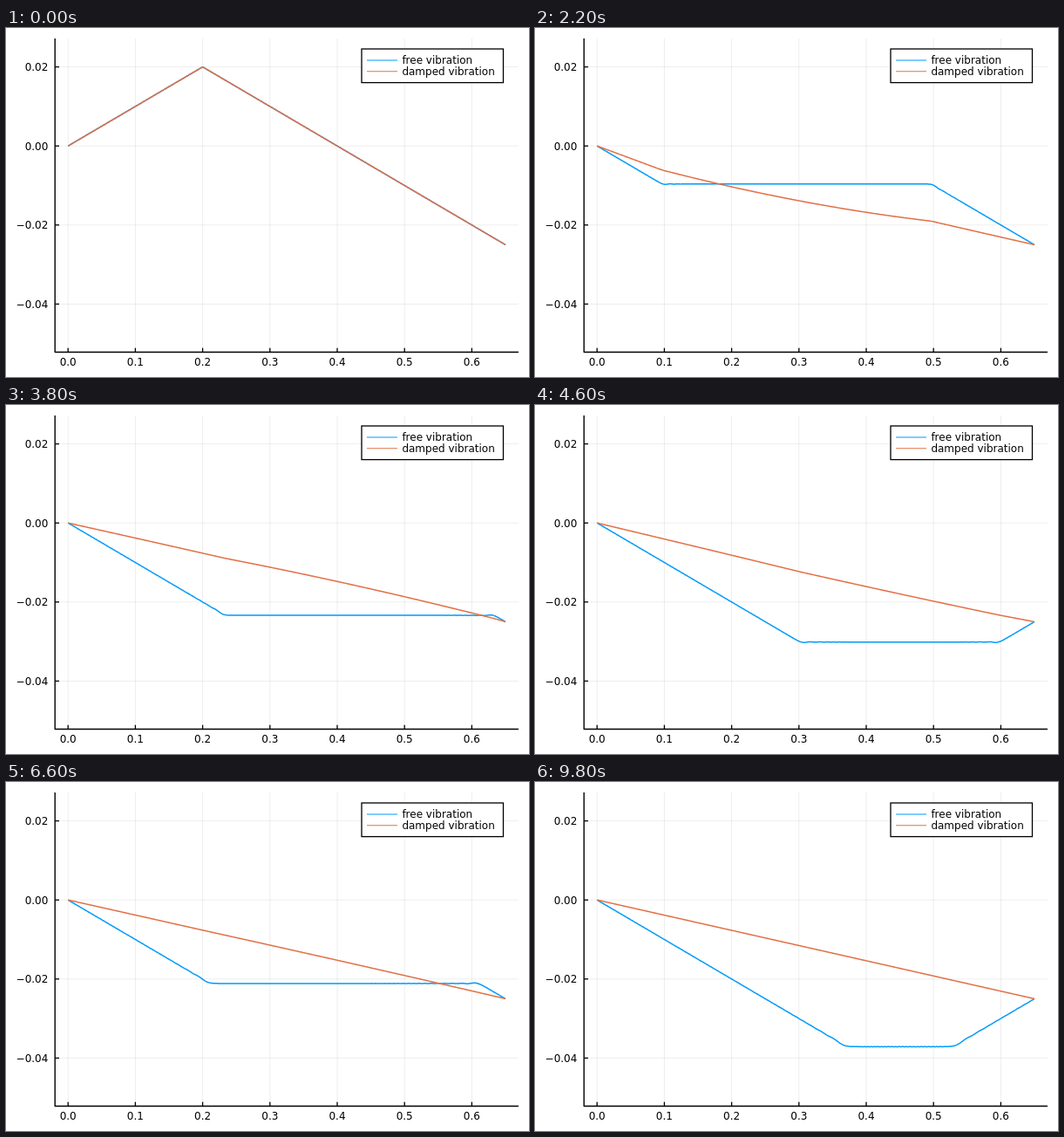
Recreate the animation shown at these times as an HTML page. Size 600 by 400 pixels, loop 10 s.

```html
<!DOCTYPE html>
<html>
<head>
<meta charset="utf-8">
<style>
  html, body { margin: 0; width: 100%; height: 100%; overflow: hidden; background: #fff; }
  svg { display: block; }
  text { font: 12px "DejaVu Sans", sans-serif; }
  path { fill: none; stroke-linejoin: round; }
</style>
</head>
<body>
<svg id="plot" width="600" height="400" viewBox="0 0 600 400"></svg>
<script>
const LENGTH = 0.65, PLUCK = 0.2, END_Y = -0.025;
const FRAMES = 50, FRAME_MS = 200;
const WAVE_STEP = 0.09125;   // distance a wave travels per frame
const DAMPING = 0.15;        // amplitude decay rate per frame
const CELLS = 1000;          // string grid, gives the slight dispersion
const SAMPLES = 650, MODES = 600;
const BLUE = '#009afa', ORANGE = '#e26f46';

const svg = document.getElementById('plot');
const px = x => 71.2 + 772 * x;
const py = y => 135.2 - 4530 * y;

function add(tag, attrs, text = '') {
  const el = document.createElementNS('http://www.w3.org/2000/svg', tag);
  for (const key in attrs) el.setAttribute(key, attrs[key]);
  el.textContent = text;
  return svg.appendChild(el);
}
const stroke = (d, color, width) => add('path', { d, stroke: color, 'stroke-width': width });
const label = (x, y, text, anchor) => add('text', { x, y, 'text-anchor': anchor }, text);

// Grid, ticks and axes
for (let i = 0; i <= 6; i++) {
  const x = px(i / 10);
  stroke(`M${x} 12V371.5`, 'rgba(0,0,0,.1)', 0.7);
  stroke(`M${x} 371.5v-4.8`, '#000', 1.3);
  label(x, 387.2, (i / 10).toFixed(1), 'middle');
}
for (let i = -2; i <= 1; i++) {
  const y = py(i * 0.02);
  stroke(`M56 ${y}H588`, 'rgba(0,0,0,.1)', 0.7);
  stroke(`M56 ${y}h5`, '#000', 1.3);
  label(48.4, y + 4.3, (i * 0.02).toFixed(2).replace('-', '\u2212'), 'end');
}
stroke('M56.2 12V371.5H588', '#000', 1.4);

const freeCurve = stroke('', BLUE, 1.5);
const dampedCurve = stroke('', ORANGE, 1.5);

// Legend
add('rect', { x: 408, y: 24, width: 162.5, height: 38.6, fill: '#fff', stroke: '#000', 'stroke-width': 1.3 });
[['free vibration', BLUE, 37], ['damped vibration', ORANGE, 49.8]].forEach(([name, color, y]) => {
  stroke(`M414 ${y}h35`, color, 1.1);
  label(454.4, y + 4.2, name, 'start');
});

// Modes of a plucked string around its resting line
const peak = PLUCK / 10 - END_Y * PLUCK / LENGTH;
const sines = Array.from({ length: 2 * SAMPLES }, (_, i) => Math.sin(Math.PI * i / SAMPLES));
const modes = Array.from({ length: MODES }, (_, i) => {
  const k = (i + 1) * Math.PI;
  return {
    amplitude: 2 * peak * LENGTH ** 2 / (k * k * PLUCK * (LENGTH - PLUCK)) * Math.sin(k * PLUCK / LENGTH),
    omega: 2 * WAVE_STEP * CELLS / LENGTH * Math.sin(k / (2 * CELLS))
  };
});

function stringPath(time, damping) {
  const decay = Math.exp(-damping * time);
  const weights = modes.map(({ amplitude, omega }) => {
    const w = Math.sqrt(omega * omega - damping * damping);
    return amplitude * decay * (Math.cos(w * time) + damping / w * Math.sin(w * time));
  });
  let d = '';
  for (let j = 0; j <= SAMPLES; j++) {
    const part = j / SAMPLES;
    let y = END_Y * part;
    for (let n = 0; n < MODES; n++) y += weights[n] * sines[(n + 1) * j % (2 * SAMPLES)];
    d += (j ? 'L' : 'M') + px(LENGTH * part).toFixed(2) + ' ' + py(y).toFixed(2);
  }
  return d;
}

let shown = -1;
function draw() {
  const frame = Math.floor(performance.now() / FRAME_MS) % FRAMES;
  if (frame !== shown) {
    shown = frame;
    freeCurve.setAttribute('d', stringPath(frame, 0));
    dampedCurve.setAttribute('d', stringPath(frame, DAMPING));
  }
  requestAnimationFrame(draw);
}
draw();
</script>
</body>
</html>
```
